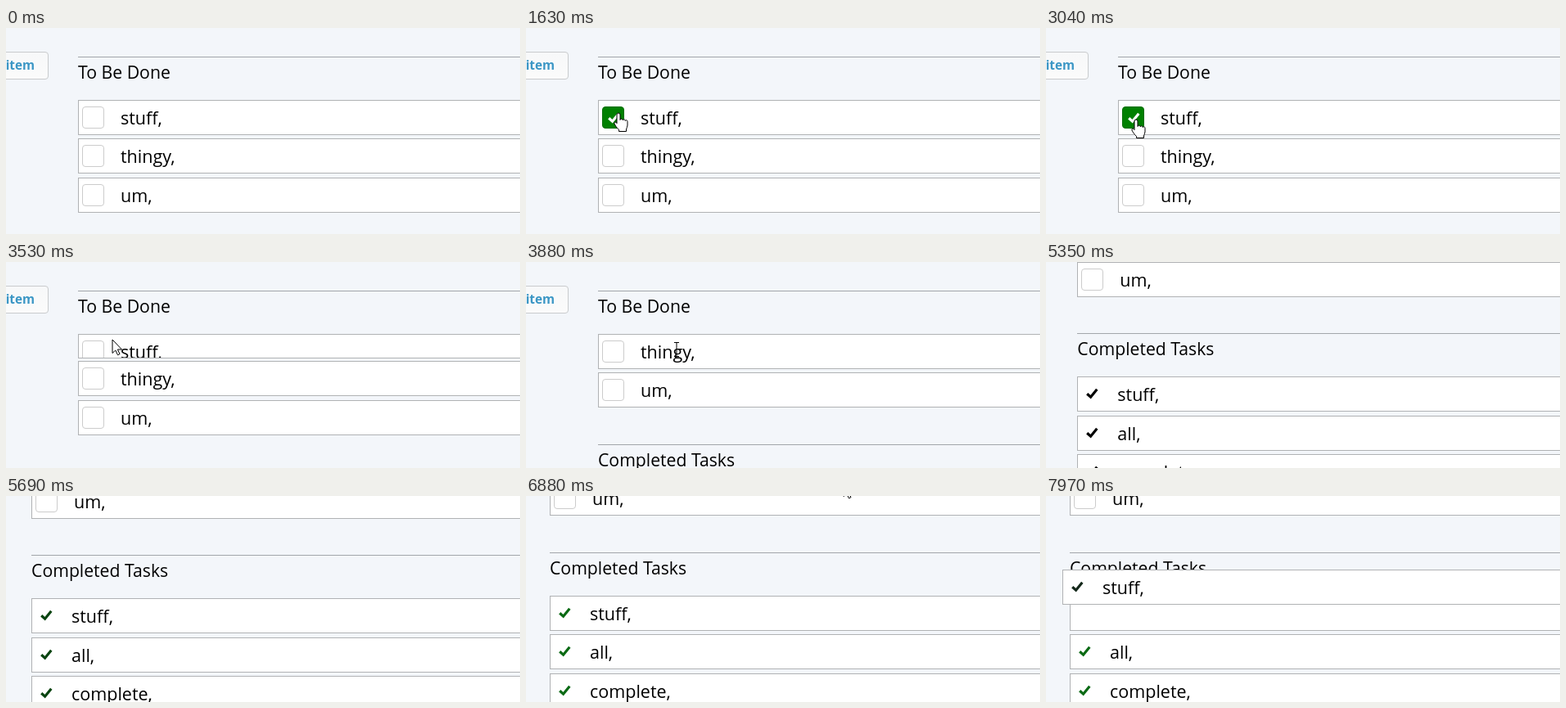
These frames come from a looping animation (628 by 252 pixels, 8000 ms). An HTML page:

```html
<!DOCTYPE html>
<html lang="en">
<head>
<meta charset="utf-8">
<title>To-do list</title>
<style>
html, body { margin: 0; width: 100%; height: 100%; overflow: hidden; background: #f3f6fa; }
body { position: relative; font: 21.5px "Open Sans", "Noto Sans", sans-serif; color: #000; }
#page, #done, .row, .head, .box, .tick, #add, #cursor { position: absolute; }
#page, #done { left: 0; top: 0; }
#add {
  left: -48px; top: 29px; width: 100px; height: 34px; box-sizing: border-box;
  border: 1px solid #c9cbcd; border-radius: 4px; padding-right: 16px;
  background: linear-gradient(#f7f8f9, #fbfbfb);
  font-size: 15.3px; font-weight: 700; line-height: 31px; text-align: right; color: #3a96c5;
}
.head { left: 88px; width: 700px; border-top: 1px solid #a2a6aa; font-size: 21.2px; line-height: 35px; white-space: nowrap; }
.row {
  left: 88px; width: 700px; height: 43px; box-sizing: border-box; overflow: hidden;
  border: 1px solid #b0b2b4; padding-left: 51px; background: #fff; line-height: 41px; white-space: nowrap;
}
#done .row { padding-left: 48px; }
.box { left: 4px; top: 7px; width: 27px; height: 27px; box-sizing: border-box; border: 1px solid #ccc; border-radius: 4px; background: #fff; }
.tick { left: -1px; top: -1px; width: 43px; height: 43px; fill: none; stroke: currentColor; stroke-width: 3.2; }
#stuff .tick { left: 0; top: 0; color: #fff; visibility: hidden; }
#stuff.hot .tick { visibility: visible; }
#stuff.hot .box { background: #008000; border-color: #006c00; }
#done { color: #000; }
#done span { color: #000; }
#cursor { left: 0; top: 0; overflow: visible; width: 1px; height: 1px; fill: #fff; stroke: #000; stroke-linejoin: round; }
</style>
</head>
<body>
<svg width="0" height="0" style="position:absolute">
  <symbol id="check" viewBox="0 0 43 43"><path d="M12.2 21.3L16.6 25.2L24.3 15.8"/></symbol>
</svg>
<div id="page">
  <div id="add">item</div>
  <div class="head" style="top:35px">To Be Done</div>
  <div class="row todo" id="stuff"><i class="box"></i><svg class="tick"><use href="#check"/></svg>stuff,</div>
  <div class="row todo"><i class="box"></i>thingy,</div>
  <div class="row todo"><i class="box"></i>um,</div>
  <div id="done">
    <div class="head" style="top:223px">Completed Tasks</div>
    <div class="row" style="top:275.9px"></div>
    <div class="row" style="top:323.4px"><svg class="tick"><use href="#check"/></svg><span>all,</span></div>
    <div class="row" style="top:370.9px"><svg class="tick"><use href="#check"/></svg><span>complete,</span></div>
    <div class="row" id="drag"><svg class="tick"><use href="#check"/></svg><span>stuff,</span></div>
  </div>
</div>
<svg id="cursor"><path id="shape"/></svg>
<script>
const LOOP = 8000, STEP = 70, PITCH = 47.5, TOP = 87.9, DONE_TOP = 275.9;
const $ = id => document.getElementById(id);
const page = $('page'), done = $('done'), stuff = $('stuff'), drag = $('drag');
const cursor = $('cursor'), shape = $('shape');
const todo = [...document.querySelectorAll('.todo')];
const ticks = [...done.querySelectorAll('.tick')];

const shapes = {
  arrow: 'M0 0V16.5L3.8 13L6.5 18.8L9 17.6L6.4 12H11.5Z',
  hand: 'M-2 2a2 2 0 0 1 4 0V8.5c0-2 3.3-1.6 3.3.4c.3-1.6 3-1.3 3 .6c.3-1.3 2.7-1 2.7.8V15c0 2-1.2 3.2-1.5 5V22.5H.5V20.5C-2 18-4 15.5-5 13c-.8-2 1.6-2.6 3-.4Z',
  beam: 'M-3-8.5H3M0-8.5V8.5M-3 8.5H3'
};

// Spans in which the pointer moves; it advances in steps and rests between them.
const spans = [[0, 0], [320, 1020], [1420, 1630], [2220, 2430], [2830, 4650], [6880, 6950]];

// time, x, y
const path = [
  [250, 600, 262], [320, 582, 233], [460, 480, 130], [600, 250, 62], [670, 130, 55],
  [740, 92, 64], [810, 180, 140], [880, 310, 180], [950, 430, 165], [1020, 470, 152],
  [1350, 470, 152], [1560, 150, 110], [1630, 113, 104],
  [2150, 113, 104], [2430, 136, 151],
  [2760, 136, 151], [3040, 110, 112], [3390, 110, 112], [3600, 140, 87], [3880, 184, 107],
  [4440, 382, -5], [4650, 363, -25],
  [6810, 363, -25], [6880, 388, -16], [6950, 388, -25]
];

const clamp = v => Math.max(0, Math.min(1, v));

function stepped(t) {
  const [from, to] = spans.filter(s => s[0] <= t).pop();
  return Math.min(to, from + STEP * Math.floor((t - from) / STEP));
}

function pointerAt(t) {
  const i = path.findIndex(p => p[0] > t);
  if (i === 0) return path[0].slice(1);
  if (i < 0) return path[path.length - 1].slice(1);
  const [t0, x0, y0] = path[i - 1], [t1, x1, y1] = path[i];
  const u = (t - t0) / (t1 - t0);
  return [x0 + (x1 - x0) * u, y0 + (y1 - y0) * u];
}

function panAt(t) {
  if (t < 5000) return [0, 0];
  let k = Math.min(10, Math.floor((t - 5000) / 69));
  if (t >= 5820) k = 12;
  if (t >= 5950) k = Infinity;
  return [-59 + 43 * 0.736 ** k, -154 + 98 * 0.7145 ** k];
}

function place(el, x, y) {
  el.style.left = x + 'px';
  el.style.top = y + 'px';
}

function draw(t) {
  const q = stepped(t);
  const [x, y] = pointerAt(q);

  // the finished row closes and everything below slides up
  const closed = 0.5 - 0.5 * Math.cos(Math.PI * clamp((q - 3390) / 380));
  todo.forEach((row, i) => {
    row.style.top = TOP + PITCH * (i - (i ? closed : 0)) + 'px';
  });
  stuff.style.height = 43 * (1 - closed) + 'px';
  stuff.style.display = closed === 1 ? 'none' : 'block';
  done.style.top = PITCH * (1 - closed) + 'px';

  const hot = q < 3450 && x > 93 && x < 121 && y > 96 && y < 123;
  stuff.classList.toggle('hot', hot);

  const inText = x > 140 && x < 207 && y > 98 && y < 122;
  const kind = hot ? 'hand' : inText ? 'beam' : 'arrow';
  shape.setAttribute('d', shapes[kind]);
  cursor.style.transform = `translate(${Math.round(x)}px, ${Math.round(y)}px)`;

  place(page, ...panAt(t));

  const pull = t < 7760 ? 0 : Math.min(4, 1 + Math.floor((t - 7760) / STEP)) / 4;
  place(drag, 88 - 9 * pull, DONE_TOP - 31.9 * pull);

  const green = t < 5400 ? '#000' : t < 5820 ? '#0a4410' : '#0a6a14';
  ticks.forEach(tick => { tick.style.color = green; });
  if (pull) drag.querySelector('.tick').style.color = '#14281a';
}

function frame() {
  draw(performance.now() % LOOP);
  requestAnimationFrame(frame);
}
frame();
</script>
</body>
</html>
```
